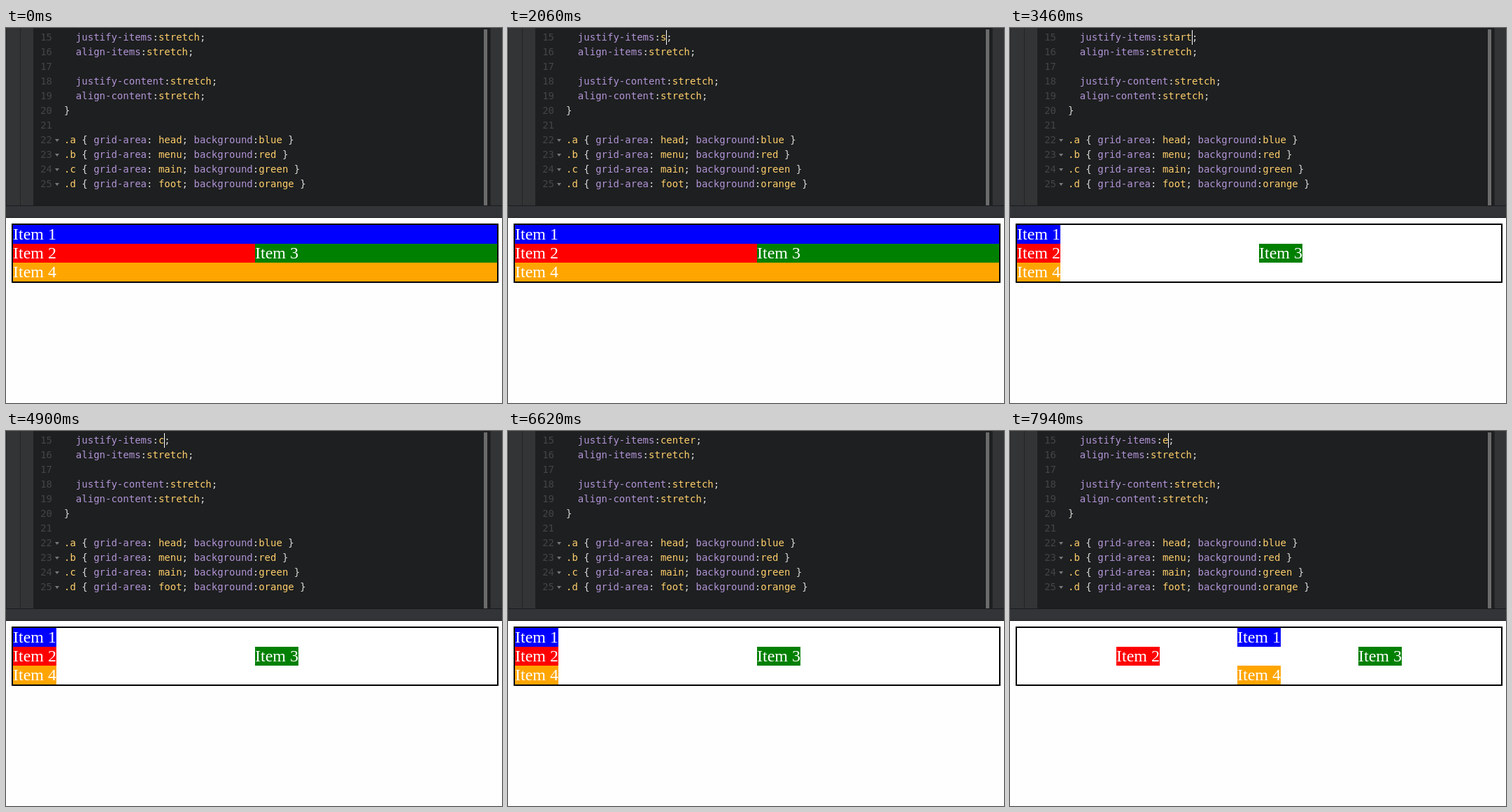
Animation of 709 by 537 pixels, one loop 8000 ms. Source, as an HTML page:

```html
<!DOCTYPE html>
<html lang="en">
<head>
<meta charset="utf-8">
<title>justify-items demo</title>
<style>
  html, body { margin: 0; width: 100%; height: 100%; overflow: hidden; background: #fefefe; }
  .editor { position: absolute; left: 0; top: 0; width: 709px; height: 254px; background: #1d1f20; overflow: hidden; }
  .editor > * { position: absolute; }
  .edge { top: 0; height: 254px; box-sizing: border-box; background: #333436; }
  .thumb { left: 683px; top: 2px; width: 5px; height: 252px; background: #6b6b6b; }
  .divider { position: absolute; left: 0; top: 254px; width: 709px; height: 18px; box-sizing: border-box;
    background: #333437; border: solid #1a1b1c; border-width: 1px 0; }
  pre { margin: 0; top: 3px; font: 14px/21px "DejaVu Sans Mono", monospace; color: #d8d8d6; }
  #code { left: 83px; }
  #numbers { left: 39px; width: 27px; text-align: right; color: #434547; }
  .prop { color: #b294d6; }
  .val { color: #ffcf6b; }
  .fold { left: 70px; border: solid transparent; border-width: 4px 3px 0; border-top-color: #77797a; }
  #selection, #cursor { top: 3px; height: 21px; }
  #selection { background: #424446; }
  #cursor { width: 1px; background: #fff; }
  #grid { position: absolute; left: 8px; top: 280px; width: 692px; border: 2px solid #000; background: #fff;
    display: grid; grid: "head head" 27px "menu main" 27px "foot foot" 27px / 1fr 1fr;
    font: 24px/27px "Liberation Serif", serif; color: #fff; }
</style>
</head>
<body>
<div class="editor">
  <div class="edge" style="left:0;width:20px;border-left:1px solid #242527"></div>
  <div class="edge" style="left:20px;width:19px;border-left:1px solid #232325"></div>
  <div class="edge" style="left:692px;width:17px;border-left:1px solid #242527"></div>
  <div class="thumb"></div>
  <pre id="numbers"></pre>
  <div id="selection"></div>
  <pre id="code"></pre>
  <div id="cursor"></div>
</div>
<div class="divider"></div>
<div id="grid">
  <div style="grid-area:head;background:blue">Item 1</div>
  <div style="grid-area:menu;background:red">Item 2</div>
  <div style="grid-area:main;background:green">Item 3</div>
  <div style="grid-area:foot;background:orange">Item 4</div>
</div>
<script>
const LOOP = 8000, FIRST_LINE = 15, LINE_HEIGHT = 21;
const CODE_LEFT = 83, CHAR = 8.428, VALUE_COL = 16;
const $ = id => document.getElementById(id);

const rule = (name, area, color) => `.${name} { grid-area: ${area}; background:${color} }`;
const lines = [
  '  justify-items:stretch;', '  align-items:stretch;', '',
  '  justify-content:stretch;', '  align-content:stretch;', '}', '',
  rule('a', 'head', 'blue'), rule('b', 'menu', 'red'),
  rule('c', 'main', 'green'), rule('d', 'foot', 'orange')
];

const highlight = line => line.replace(/[\w-]+(?=:)|\.?[a-z]+/g, (word, at) =>
  `<span class="${line[at + word.length] === ':' ? 'prop' : 'val'}">${word}</span>`);

$('code').innerHTML = lines.map(highlight).join('\n');
$('numbers').textContent = lines.map((_, i) => FIRST_LINE + i).join('\n');
lines.forEach((line, i) => {
  if (!line.startsWith('.')) return;
  const fold = document.createElement('div');
  fold.className = 'fold';
  fold.style.top = 12 + i * LINE_HEIGHT + 'px';
  document.querySelector('.editor').append(fold);
});
const valueSpan = document.querySelector('#code .val');

// Each step: time, typed value, caret column (null = hidden), whether the value is selected
const steps = [[0, 'stretch', null]];
const add = (time, value, caret = VALUE_COL + value.length, selected = false) =>
  steps.push([time, value, caret, selected]);
const hide = (time, value) => add(time, value, null);
const select = (time, value) => add(time, value, VALUE_COL, true);
const type = (word, times) => times.forEach((time, i) => add(time, word.slice(0, i + 1)));

add(500, 'stretch', 0);
add(540, 'stretch');
hide(940, 'stretch');
add(1420, 'stretch');
select(1780, 'stretch');
type('start', [2060, 2140, 2300, 2380, 2460]);
hide(2900, 'start');
add(3380, 'start');
hide(3820, 'start');
select(4100, 'start');
add(4540, 'start', null, true);
type('center', [4900, 4980, 5060, 5140, 5220, 5300]);
hide(5740, 'center');
add(6180, 'center');
hide(6620, 'center');
add(7100, 'center');
select(7540, 'center');
type('e', [7940]);

const columnX = col => Math.round(CODE_LEFT + col * CHAR);

function draw() {
  const t = performance.now() % LOOP;
  const [, value, caret, selected] = steps.findLast(step => step[0] <= t);
  const left = columnX(VALUE_COL);

  if (valueSpan.textContent !== value) valueSpan.textContent = value;
  $('cursor').hidden = caret === null;
  $('cursor').style.left = columnX(caret ?? 0) + 'px';
  $('selection').hidden = !selected;
  $('selection').style.left = left + 'px';
  $('selection').style.width = columnX(VALUE_COL + value.length) - left + 'px';
  $('grid').style.justifyItems = t < 3460 ? 'stretch' : t < 6780 ? 'start' : 'center';
  requestAnimationFrame(draw);
}
draw();
</script>
</body>
</html>
```
